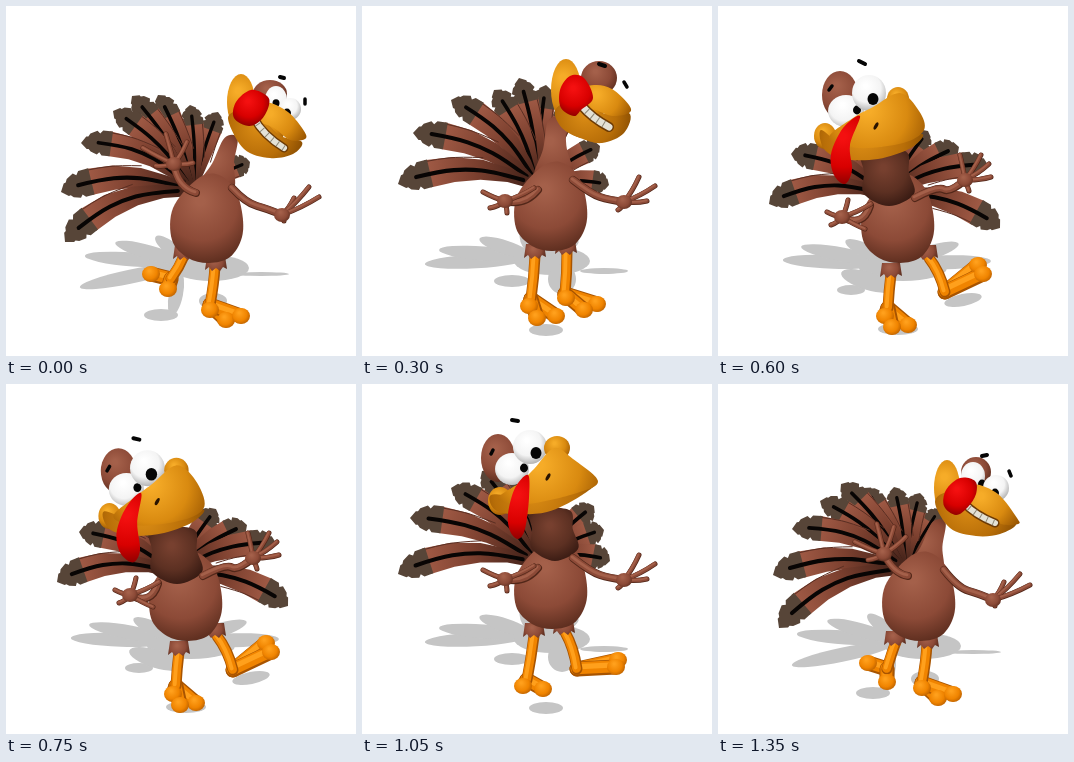
Animation of 350 by 350 pixels, one loop 1500 ms. Source, as an HTML page with a canvas:

```html
<!DOCTYPE html>
<html lang="en">
<head>
<meta charset="utf-8">
<title>Dancing turkey</title>
<style>
html, body { margin: 0; width: 100%; height: 100%; overflow: hidden; background: #fff; }
canvas { display: block; width: 350px; height: 350px; }
</style>
</head>
<body>
<canvas id="stage" width="350" height="350"></canvas>
<script>
const c = document.getElementById('stage').getContext('2d');
const STEP = 150;

// Light, middle and dark tones
const BROWN = ['#a4604a', '#8c4a37', '#522719'];
const UMBER = ['#77402f', '#5c3022', '#321710'];
const ORANGE = ['#ffa01c', '#f08400', '#a85400'];
const BEAK = ['#f6ac28', '#d98a10', '#955200'];
const RED = ['#f41010', '#d80000', '#7c0000'];
const WHITE = ['#ffffff', '#f4f4f4', '#a2a2a2'];
const GREY = '#c5c5c5';

const pairs = a => a.reduce((out, v, i) => (i % 2 ? out[out.length - 1].push(v) : out.push([v]), out), []);
const shift = (pts, dx, dy) => pts.map(([x, y]) => [x + dx, y + dy]);

function shade(x, y, w, h, tones) {
  const r = Math.max(w, h, 1);
  const g = c.createRadialGradient(x + w * .4, y + h * .3, r * .05, x + w * .45, y + h * .4, r * .68);
  g.addColorStop(0, tones[0]);
  g.addColorStop(.55, tones[1]);
  g.addColorStop(1, tones[2]);
  return g;
}

// Closed smooth outline through the points
function blob(pts, tones) {
  const n = pts.length, at = i => pts[(i + n) % n];
  c.beginPath();
  c.moveTo(...pts[0]);
  for (let i = 0; i < n; i++) {
    const [a, b, d, e] = [at(i - 1), at(i), at(i + 1), at(i + 2)];
    c.bezierCurveTo(b[0] + (d[0] - a[0]) / 6, b[1] + (d[1] - a[1]) / 6,
      d[0] - (e[0] - b[0]) / 6, d[1] - (e[1] - b[1]) / 6, d[0], d[1]);
  }
  const xs = pts.map(p => p[0]), ys = pts.map(p => p[1]);
  const x = Math.min(...xs), y = Math.min(...ys);
  c.fillStyle = typeof tones === 'string' ? tones
    : shade(x, y, Math.max(...xs) - x, Math.max(...ys) - y, tones);
  c.fill();
}

function oval(x, y, rx, ry, tones, turn = 0) {
  if (rx < 1) return;
  c.beginPath();
  c.ellipse(x, y, rx, ry, turn, 0, 7);
  c.fillStyle = typeof tones === 'string' ? tones : shade(x - rx, y - ry, rx * 2, ry * 2, tones);
  c.fill();
}

function line(pts, width, color) {
  c.beginPath();
  c.moveTo(...pts[0]);
  for (let i = 1; i < pts.length - 1; i++) {
    const [p, q] = [pts[i], pts[i + 1]];
    const end = i === pts.length - 2 ? q : [(p[0] + q[0]) / 2, (p[1] + q[1]) / 2];
    c.quadraticCurveTo(...p, ...end);
  }
  if (pts.length === 2) c.lineTo(...pts[1]);
  c.lineWidth = width;
  c.strokeStyle = color;
  c.lineCap = c.lineJoin = 'round';
  c.stroke();
}

function limb(flat, w, tones) {
  const pts = pairs(flat);
  line(pts, w, tones[2]);
  line(shift(pts, -w * .04, -w * .05), w * .8, tones[1]);
  line(shift(pts, -w * .12, -w * .14), w * .35, tones[0]);
}

function feather(base, [tx, ty, bend, w]) {
  const [bx, by] = base, dx = tx - bx, dy = ty - by, len = Math.hypot(dx, dy);
  const s = (dx < 0 ? 2 : -2) * bend / len;
  const cx = (bx + tx) / 2 - dy * s, cy = (by + ty) / 2 + dx * s;
  const point = (t, off = 0) => {
    const u = 1 - t;
    const vx = u * (cx - bx) + t * (tx - cx), vy = u * (cy - by) + t * (ty - cy), l = Math.hypot(vx, vy);
    return [u * u * bx + 2 * u * t * cx + t * t * tx - vy / l * off,
      u * u * by + 2 * u * t * cy + t * t * ty + vx / l * off];
  };
  const fill = (edge, color) => {
    c.beginPath();
    edge.forEach(([t, k]) => c.lineTo(...point(t, k * w / 2)));
    [...edge].reverse().forEach(([t, k]) => c.lineTo(...point(t, -k * w / 2)));
    c.closePath();
    c.fillStyle = color;
    c.fill();
  };
  const g = c.createLinearGradient(bx, by, tx, ty);
  g.addColorStop(.1, '#4a261c');
  g.addColorStop(.45, '#7c402f');
  g.addColorStop(.8, '#a05a45');
  fill([[0, .3], [.2, .5], [.4, .72], [.6, .9], [.79, 1]], g);
  line([.4, .55, .7, .78].map(t => point(t, w * .44)), 1, '#5a2e22');
  fill([[.77, 1], [.84, 1], [.86, .75], [.88, .95], [.93, .72], [.945, .5], [.96, .5], [1, 0]], '#574538');
  line([.1, .3, .5, .7, .87].map(t => point(t)), w * .15, '#080504');
}

function drawShadow({ from, tips, spots }) {
  tips.forEach(([x, y]) => {
    const dx = x - from[0], dy = y - from[1];
    oval(from[0] + dx * .55, from[1] + dy * .55, Math.hypot(dx, dy) * .46, 7, GREY, Math.atan2(dy, dx));
  });
  spots.forEach(([x, y, rx, ry, turn]) => oval(x, y, rx, ry, GREY, turn));
}

function drawLeg({ cuff, shin, toes }) {
  toes.forEach(t => limb([...shin.slice(-2), ...t], 15, ORANGE));
  limb(shin, 11, ORANGE);
  toes.forEach(([x, y]) => oval(x, y, 9, 8, ORANGE));
  const [x, y] = cuff;
  c.beginPath();
  [[-9, -9], [9, -9], [11, 4], [7, 2], [4, 6], [0, 3], [-4, 6], [-7, 2], [-11, 5]]
    .forEach(([a, b]) => c.lineTo(x + a, y + b));
  c.fillStyle = shade(x - 10, y - 9, 20, 15, BROWN);
  c.fill();
}

function drawArm({ arm, tips }) {
  const palm = arm.slice(-2);
  limb(arm, 8, BROWN);
  tips.forEach(([x, y]) => limb([...palm, (palm[0] + x) / 2 + 1, (palm[1] + y) / 2 + 2, x, y], 5, BROWN));
  oval(...palm, 8, 7, BROWN);
}

function drawNeck([x0, y0, x1, y1, w0, w1], tones) {
  const mx = (x0 + x1) / 2, my = (y0 + y1) / 2, wm = w0 * .35 + w1 * .65;
  blob([[x1 - w1 / 2, y1], [mx - wm / 2, my], [x0 - w0 / 2, y0], [x0, y0 + 12],
    [x0 + w0 / 2, y0], [mx + wm / 2, my], [x1 + w1 / 2, y1]], tones);
}

function drawHead(h) {
  oval(...h.skull, BROWN);
  [0, 1].forEach(i => {
    oval(...h.eyes.slice(i * 4, i * 4 + 4), WHITE);
    const [x, y, r] = h.pupils.slice(i * 3, i * 3 + 3);
    oval(x, y, r, r * 1.1, '#050505');
  });
  oval(...h.cheeks.slice(4), BEAK);
  oval(...h.cheeks.slice(0, 4), BEAK);
  blob(pairs(h.lower), ['#d88a14', '#b86e08', '#7c4400']);
  blob(pairs(h.upper), BEAK);
  const [w, ...row] = h.teeth;
  if (w > 2) {
    line(pairs(row), w + 3, '#6c3a04');
    line(pairs(row), w, '#e4e2d6');
    c.setLineDash([1, 6]);
    c.lineCap = 'butt';
    const [a, b, d] = pairs(row);
    c.beginPath();
    c.moveTo(...a);
    c.quadraticCurveTo(...b, ...d);
    c.strokeStyle = '#8d8878';
    c.stroke();
    c.setLineDash([]);
  } else {
    oval(h.nostril[0], h.nostril[1], 1.7, 4, '#2a1400', .5);
  }
  blob(pairs(h.wattle), RED);
  const [a, b, d, e] = pairs(h.brows);
  line([a, b], 4, '#050505');
  line([d, e], 3.5, '#050505');
}

const mix = (a, b, k, dy = 0) => Object.fromEntries(Object.keys(a).map(key =>
  [key, a[key].map((v, i) => v + (b[key][i] - v) * k)])
  .map(([key, list]) => [key, dy ? lift(key, list, dy) : list]));

// Moves only the entries that are vertical positions
function lift(key, list, dy) {
  const isY = {
    eyes: i => i % 4 === 1, cheeks: i => i % 4 === 1, skull: i => i === 1,
    pupils: i => i % 3 === 1, teeth: i => i && i % 2 === 0
  }[key] || (i => i % 2 === 1);
  return list.map((v, i) => isY(i) ? v + dy : v);
}

const heads = {
  right: {
    skull: [264, 88, 17, 14], eyes: [270, 94, 11, 14, 284, 103, 11, 11], pupils: [270, 97, 3.5, 281, 107, 4],
    cheeks: [235, 96, 14, 28, 258, 125, 20, 20],
    upper: [240, 100, 260, 96, 282, 106, 298, 125, 299, 133, 284, 134, 268, 122, 250, 114],
    lower: [222, 112, 238, 105, 258, 115, 275, 130, 296, 136, 287, 148, 264, 152, 238, 143],
    teeth: [6, 248, 112, 257, 129, 278, 142], nostril: [276, 110],
    wattle: [261, 90, 245, 84, 230, 96, 228, 112, 243, 120, 256, 113, 263, 99],
    brows: [274, 71, 278, 72, 299, 93, 299, 98]
  },
  near: {
    skull: [258, 88, 15, 15], eyes: [255, 92, 12, 14, 278, 104, 13, 13], pupils: [264, 100, 4, 277, 109, 4],
    cheeks: [229, 104, 13, 28, 252, 130, 20, 20],
    upper: [238, 105, 256, 100, 280, 110, 299, 134, 300, 140, 283, 140, 265, 128, 248, 119],
    lower: [217, 118, 232, 108, 255, 120, 275, 135, 298, 140, 282, 150, 258, 152, 232, 144],
    teeth: [6, 246, 119, 257, 131, 277, 139], nostril: [276, 116],
    wattle: [257, 97, 242, 94, 228, 106, 226, 122, 238, 131, 250, 123, 258, 110],
    brows: [264, 72, 269, 71, 291, 87, 293, 92]
  },
  away: {
    skull: [237, 72, 18, 17], eyes: [236, 84, 0, 0, 248, 88, 0, 0], pupils: [240, 68, 0, 250, 82, 0],
    cheeks: [204, 84, 15, 31, 222, 112, 20, 20],
    upper: [212, 86, 232, 79, 250, 83, 267, 99, 267, 107, 250, 110, 234, 104, 219, 99],
    lower: [193, 105, 209, 95, 235, 107, 267, 107, 262, 127, 240, 137, 218, 132, 200, 122],
    teeth: [7, 220, 100, 230, 112, 247, 121], nostril: [242, 90],
    wattle: [222, 72, 208, 70, 198, 84, 199, 102, 212, 110, 219, 104, 231, 92],
    brows: [237, 58, 243, 60, 262, 76, 265, 81]
  },
  front: {
    skull: [150, 67, 20, 20], eyes: [148, 82, 19, 14, 176, 76, 15, 18], pupils: [159, 86, 4, 178, 81, 5.5],
    cheeks: [120, 100, 11, 14, 202, 95, 10, 13],
    upper: [118, 99, 140, 94, 166, 91, 195, 91, 212, 106, 208, 122, 175, 119, 136, 116],
    lower: [122, 106, 150, 112, 185, 118, 208, 122, 190, 133, 165, 138, 140, 133, 128, 120],
    teeth: [0, 150, 117, 170, 120, 190, 121], nostril: [171, 102],
    wattle: [160, 92, 143, 97, 128, 119, 131, 138, 143, 146, 150, 138, 146, 116],
    brows: [177, 43, 182, 48, 142, 55, 144, 53]
  },
  tilt: {
    skull: [122, 89, 18, 24], eyes: [128, 105, 18, 16, 151, 87, 17, 18], pupils: [139, 104, 4, 155, 93, 5.5],
    cheeks: [107, 130, 11, 13, 180, 93, 11, 12],
    upper: [111, 132, 135, 112, 155, 101, 182, 87, 201, 105, 206, 124, 185, 137, 140, 142],
    lower: [103, 124, 125, 138, 165, 140, 204, 128, 193, 142, 160, 153, 125, 153, 106, 143],
    teeth: [0, 130, 145, 160, 145, 190, 138], nostril: [158, 120],
    wattle: [142, 110, 125, 122, 113, 148, 116, 169, 127, 178, 134, 164, 132, 139],
    brows: [141, 55, 147, 58, 111, 84, 114, 80]
  },
  low: {
    skull: [98, 99, 17, 21], eyes: [109, 121, 17, 17, 127, 95, 18, 18], pupils: [120, 118, 4, 131, 101, 6],
    cheeks: [98, 150, 11, 13, 156, 91, 14, 13],
    upper: [102, 150, 118, 131, 132, 114, 152, 88, 172, 98, 187, 135, 166, 149, 127, 156],
    lower: [90, 148, 120, 145, 155, 146, 187, 137, 178, 147, 155, 158, 125, 165, 98, 162],
    teeth: [0, 115, 158, 145, 157, 175, 146], nostril: [141, 129],
    wattle: [125, 123, 113, 140, 107, 164, 112, 184, 127, 194, 134, 184, 130, 154],
    brows: [107, 68, 113, 67, 86, 106, 88, 101]
  },
  turn: {
    skull: [136, 74, 17, 24], eyes: [150, 85, 17, 16, 168, 63, 17, 17], pupils: [162, 84, 4, 174, 69, 5.5],
    cheeks: [138, 117, 12, 14, 195, 64, 13, 12],
    upper: [136, 115, 157, 99, 172, 85, 192, 64, 211, 75, 236, 97, 215, 109, 165, 120],
    lower: [129, 111, 155, 112, 195, 107, 234, 98, 217, 113, 185, 128, 150, 130, 132, 125],
    teeth: [0, 150, 122, 180, 118, 210, 109], nostril: [186, 93],
    wattle: [166, 91, 153, 104, 146, 130, 148, 147, 156, 155, 163, 145, 167, 114],
    brows: [150, 36, 156, 37, 129, 70, 131, 66]
  }
};

// Feathers: tip x, tip y, bend, width
const fans = {
  right: [[244, 156, 3, 22], [212, 106, 2, 22], [184, 99, 3, 22], [152, 89, 5, 24], [126, 90, 6, 24],
    [107, 105, 9, 24], [75, 137, 16, 25], [55, 186, 15, 27], [59, 236, 18, 27]],
  near: [[222, 125, 2, 20], [202, 109, 2, 22], [176, 103, 3, 22], [146, 104, 5, 23], [123, 100, 7, 25],
    [102, 117, 9, 24], [74, 145, 15, 25], [55, 191, 14, 27], [61, 244, 18, 27]],
  away: [[247, 179, 5, 23], [238, 140, 4, 23], [210, 95, 2, 22], [184, 79, 2, 24], [157, 72, 5, 25],
    [132, 84, 7, 25], [89, 94, 12, 26], [51, 127, 14, 27], [36, 178, 16, 28]],
  front: [[200, 115, 2, 24], [133, 120, 2, 24], [102, 116, 5, 26], [64, 147, 10, 26], [46, 193, 15, 26],
    [234, 124, 5, 26], [255, 151, 9, 26], [278, 207, 11, 27]],
  tilt: [[210, 125, 2, 24], [140, 140, 2, 24], [108, 147, 4, 25], [73, 148, 10, 26], [51, 198, 15, 26],
    [241, 141, 6, 26], [270, 159, 10, 26], [282, 222, 13, 27]],
  low: [[204, 117, 2, 24], [140, 140, 2, 24], [100, 140, 4, 25], [65, 151, 10, 26], [46, 197, 15, 26],
    [231, 129, 6, 26], [260, 157, 10, 26], [277, 211, 12, 27]],
  turn: [[232, 122, 4, 24], [242, 146, 5, 24], [248, 177, 8, 24], [150, 90, 4, 24], [120, 87, 6, 25],
    [89, 104, 11, 26], [48, 134, 13, 27], [36, 190, 16, 27]]
};

const rightLeg = { cuff: [210, 259], shin: [209, 260, 208, 278, 204, 299], toes: [[204, 304], [220, 314], [235, 310]] };
const stage = {
  right: {
    body: [0, 0], root: [187, 186],
    shadow: {
      from: [185, 258], tips: [[75, 281], [80, 250], [110, 237], [150, 231], [220, 236]],
      spots: [[205, 262, 38, 13, 0], [255, 268, 28, 2, 0], [170, 288, 7, 22, .2], [155, 309, 17, 6, 0], [207, 295, 14, 8, 0]]
    },
    legs: [{ cuff: [178, 248], shin: [178, 250, 173, 262, 165, 273], toes: [[145, 268], [162, 283]] }, rightLeg],
    arms: [
      { arm: [226, 182, 240, 197, 262, 203, 276, 209], tips: [[288, 192], [303, 181], [313, 191], [278, 215]] },
      { arm: [190, 187, 172, 182, 168, 158], tips: [[160, 128], [181, 136], [187, 157], [137, 142], [150, 160]] }]
  },
  middle: {
    body: [-12, -12], root: [175, 180],
    shadow: {
      from: [175, 252], tips: [[64, 258], [78, 244], [118, 233], [160, 225], [216, 235]],
      spots: [[190, 255, 38, 14, 0], [242, 265, 24, 3, 0], [150, 275, 18, 6, 0], [200, 273, 14, 15, 0], [184, 324, 17, 6, 0]]
    },
    arms: [
      { arm: [211, 174, 229, 188, 247, 194, 262, 196], tips: [[277, 171], [293, 180], [285, 195], [256, 204]] },
      { arm: [176, 184, 163, 200, 143, 195], tips: [[121, 186], [128, 202], [145, 207], [172, 182]] }]
  },
  left: {
    body: [-21, 0], root: [168, 190],
    shadow: {
      from: [175, 258], tips: [[66, 254], [84, 241], [128, 235], [240, 238], [272, 255]],
      spots: [[185, 262, 44, 13, 0], [133, 284, 14, 5, 0], [150, 275, 28, 9, .3], [245, 294, 19, 6, -.2], [180, 323, 20, 6, 0]]
    },
    legs: [
      { cuff: [173, 266], shin: [173, 268, 171, 284, 170, 302], toes: [[167, 310], [190, 319], [174, 321]] },
      { cuff: [209, 248], shin: [211, 252, 222, 266, 227, 286], toes: [[260, 259], [265, 268]] }],
    arms: [
      { arm: [197, 192, 220, 180, 232, 187, 247, 174], tips: [[242, 149], [263, 149], [271, 158], [273, 171], [251, 185]] },
      { arm: [152, 200, 145, 222, 124, 211], tips: [[109, 206], [113, 219], [130, 194], [153, 198], [147, 223]] }]
  }
};

const nearPose = {
  ...stage.right,
  legs: [{ cuff: [177, 256], shin: [178, 258, 174, 268, 169, 285], toes: [[150, 279], [169, 298]] }, rightLeg],
  arms: [
    { arm: [226, 186, 240, 204, 262, 210, 275, 216], tips: [[286, 198], [302, 190], [312, 201], [277, 222]] },
    { arm: [190, 192, 176, 190, 166, 170], tips: [[159, 140], [176, 143], [188, 153], [137, 158], [150, 176]] }]
};
const awayLegs = [
  { cuff: [173, 247], shin: [173, 250, 172, 272, 169, 293], toes: [[167, 300], [194, 310], [175, 312]] },
  { cuff: [204, 243], shin: [205, 246, 205, 268, 203, 288], toes: [[204, 292], [235, 298], [222, 304]] }];
const turnLegs = [
  { cuff: [172, 248], shin: [172, 252, 169, 275, 165, 296], toes: [[161, 302], [181, 305]] },
  { cuff: [202, 245], shin: [203, 248, 212, 264, 215, 285], toes: [[256, 276], [254, 283]] }];

const pose = (place, fan, head, neck, dark, legs) =>
  ({ ...place, fan: fans[fan], head, neck, dark, legs: legs || place.legs });
const { right, near, away, front, tilt, low, turn } = heads;
const sideNeck = [209, 183, 225, 132, 38, 13];
const lowNeck = [166, 192, 158, 155, 52, 46];
const tiltNeck = [171, 188, 166, 145, 50, 42];

const poses = [
  pose(stage.right, 'right', right, sideNeck),
  pose(nearPose, 'near', mix(right, away, .18, 5), sideNeck),
  pose(stage.middle, 'away', away, [192, 172, 194, 114, 40, 15], false, awayLegs),
  pose(stage.left, 'front', front, [168, 187, 163, 130, 46, 30], true),
  pose(stage.left, 'tilt', tilt, tiltNeck, true),
  pose(stage.left, 'tilt', mix(tilt, low, .4, -6), tiltNeck, true),
  pose(stage.left, 'low', low, lowNeck, true),
  pose(stage.middle, 'turn', turn, [193, 165, 188, 126, 46, 38], true, turnLegs),
  pose(nearPose, 'near', mix(turn, near, .35, -3), [207, 180, 204, 128, 42, 26], true),
  pose(nearPose, 'near', near, [206, 188, 221, 138, 38, 13])
];

const belly = pairs([190, 174, 167, 202, 166, 234, 182, 252, 203, 257, 224, 251, 236, 231, 236, 206, 228, 182, 210, 168]);

function draw(p) {
  c.fillStyle = '#fff';
  c.fillRect(0, 0, 350, 350);
  drawShadow(p.shadow);
  p.fan.forEach(f => feather(p.root, f));
  p.legs.forEach(drawLeg);
  if (!p.dark) drawNeck(p.neck, BROWN);
  blob(shift(belly, ...p.body), BROWN);
  if (p.dark) drawNeck(p.neck, UMBER);
  p.arms.forEach(drawArm);
  drawHead(p.head);
}

const start = performance.now();
let shown = -1;
function tick() {
  const i = Math.floor((performance.now() - start) / STEP) % poses.length;
  if (i !== shown) draw(poses[shown = i]);
  requestAnimationFrame(tick);
}
tick();
</script>
</body>
</html>
```
